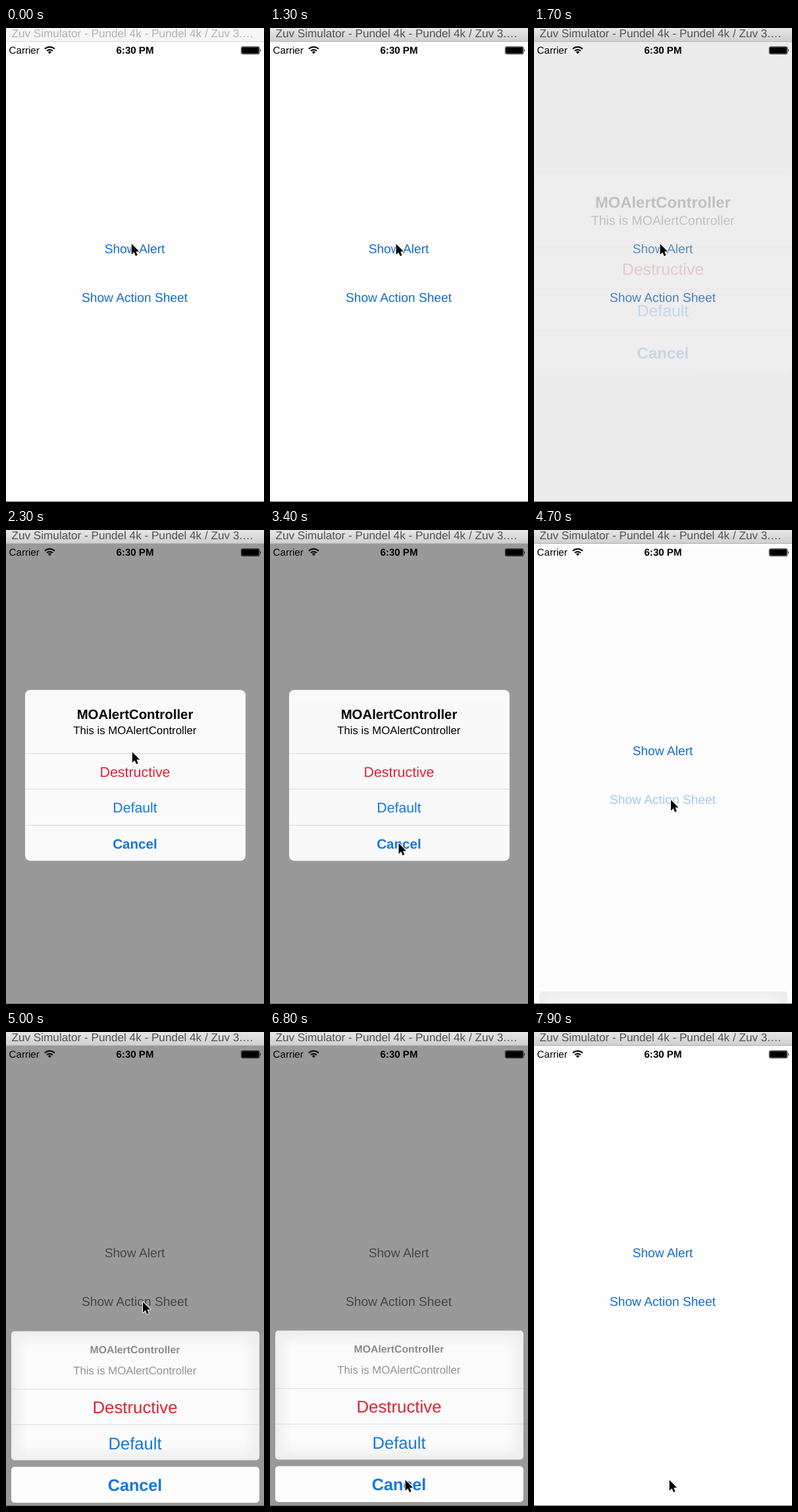
Write an HTML page that moves like this. It is 392 px wide and 720 px high and loops after 8 s.

```html
<!DOCTYPE html>
<html lang="en">
<head>
<meta charset="utf-8">
<title>Alert and action sheet</title>
<style>
  html, body { margin: 0; width: 100%; height: 100%; overflow: hidden; background: #fefefe; }
  svg { display: block; width: 392px; height: 720px; }
  text { font-family: "Liberation Sans", Arial, sans-serif; text-rendering: geometricPrecision; }
  .mid { text-anchor: middle; }
  .bold { font-weight: bold; }
  .red { fill: #da2432; }
  .blue { fill: #1377de; }
  .line { stroke: #dcdcde; stroke-width: 1; }
  .glow { filter: blur(9px); }
</style>
</head>
<body>
<svg viewBox="0 0 392 720" xmlns="http://www.w3.org/2000/svg">
  <defs>
    <linearGradient id="chrome" x2="0" y2="1">
      <stop offset="0" stop-color="#e6e6e6"/>
      <stop offset="1" stop-color="#cfcfcf"/>
    </linearGradient>
    <clipPath id="panelClip"><rect x="8" y="453.5" width="377" height="196" rx="5"/></clipPath>
    <clipPath id="phoneClip"><rect y="21" width="392" height="698"/></clipPath>
  </defs>

  <rect width="392" height="720" fill="#fefefe"/>
  <g id="buttons" class="mid" font-size="19.2">
    <text id="alertBtn" x="195.5" y="342">Show Alert</text>
    <text id="sheetBtn" x="195.5" y="416">Show Action Sheet</text>
  </g>
  <rect id="dim" y="21" width="392" height="699"/>

  <g id="status">
    <text x="4.6" y="39" font-size="15.1">Carrier</text>
    <text x="196" y="39" font-size="15.1" class="mid bold">6:30 PM</text>
    <g fill="none" stroke="#000" stroke-width="2">
      <path d="M58.9 31.8a10.6 10.6 0 0 1 15 0"/>
      <path d="M61.9 34.8a6.4 6.4 0 0 1 9 0"/>
    </g>
    <path d="M66.4 39.2l-2.6-2.7a3.7 3.7 0 0 1 5.2 0z"/>
    <rect x="357.4" y="28.4" width="27.7" height="11.2" rx="2" fill="none" stroke="#000" stroke-width=".8"/>
    <rect x="358.2" y="29.2" width="26" height="9.6" rx="1.2"/>
    <path d="M386 32q2 2 0 4z"/>
  </g>

  <g id="alert" class="mid">
    <rect x="29" y="243" width="335" height="259.5" rx="8" fill="#fafafa"/>
    <path class="line" d="M29 339.5H364M29 393.5H364M29 448.5H364"/>
    <text x="196" y="287" font-size="20.4" class="bold">MOAlertController</text>
    <text x="195.8" y="309.5" font-size="16.75">This is MOAlertController</text>
    <text x="196" y="374.5" font-size="21.4" class="red">Destructive</text>
    <text x="196" y="429.2" font-size="21.3" class="blue">Default</text>
    <text x="196" y="483.5" font-size="20.6" class="blue bold">Cancel</text>
  </g>

  <g clip-path="url(#phoneClip)">
    <g id="sheet" class="mid">
      <g clip-path="url(#panelClip)">
        <rect x="8" y="453" width="377" height="197" fill="#eeeeee"/>
        <rect x="20" y="466" width="353" height="172" fill="#fbfbfb" class="glow"/>
        <path class="line" d="M8 541.5H385M8 595.5H385"/>
      </g>
      <rect x="8" y="659.5" width="377" height="54.5" rx="5" fill="#fdfdfd"/>
      <text x="196" y="486.7" font-size="15.8" class="bold" fill="#8a8a8a">MOAlertController</text>
      <text x="195.8" y="519.2" font-size="16.75" fill="#939393">This is MOAlertController</text>
      <text x="196" y="578.2" font-size="25.8" class="red">Destructive</text>
      <text x="196" y="632.6" font-size="25.6" class="blue">Default</text>
      <text x="196" y="696.4" font-size="25.2" class="blue bold">Cancel</text>
    </g>
  </g>

  <rect id="bar" width="392" height="20.5"/>
  <rect id="barLine" y="20" width="392" height="1"/>
  <text id="title" x="8.5" y="14" font-size="17.15">Zuv Simulator - Pundel 4k - Pundel 4k / Zuv 3.…</text>
  <rect y="719" width="392" height="1" fill="#6c6c6c"/>

  <path id="cursor" d="M0 0V16.2L3.8 12.7 6.2 18.4 8.9 17.3 6.5 11.6H11.5Z"
        stroke="#fff" stroke-width="2" stroke-linejoin="round" paint-order="stroke"/>
</svg>

<script>
const LOOP = 8000, STEP = 100;
const $ = id => document.getElementById(id);
const set = (id, attrs) => {
  for (const k in attrs) $(id).setAttribute(k, attrs[k]);
};

const ramp = (t, a, b) => Math.min(1, Math.max(0, (t - a) / (b - a)));
const ease = (t, a, b) => {
  const p = ramp(t, a, b);
  return p < .5 ? 2 * p * p : 1 - 2 * (1 - p) ** 2;
};
const mix = (a, b, p) => a + (b - a) * p;
// Critically damped spring, 0 to 1
const spring = (t, start, w) => {
  const x = Math.max(0, t - start) / 1000 * w;
  return 1 - (1 + x) * Math.exp(-x);
};

// Pointer legs: start, end, target x, target y
const legs = [
  [0, 300, 145, 403],
  [300, 600, 239, 404],
  [700, 1000, 191.6, 328],
  [2150, 3000, 195.5, 475.8],
  [3650, 4300, 208, 410],
  [5650, 6500, 205.7, 680.6]
];
function pointer(t) {
  let x = 190.8, y = 327.8;
  for (const [a, b, tx, ty] of legs) {
    const p = ease(t, a, b);
    x = mix(x, tx, p);
    y = mix(y, ty, p);
  }
  return [x, y];
}

const TINT = [20, 110, 204], GRAY = [114, 114, 114];
const press = (t, down, up) =>
  t >= down && t < up + 300 ? mix(.25, 1, ease(t, up, up + 300)) : 1;

function draw(t) {
  const active = t >= 1300;
  set("bar", { fill: active ? "url(#chrome)" : "#f6f6f6" });
  set("barLine", { fill: active ? "#b2b2b2" : "#d6d6d6" });
  set("title", { fill: active ? "#505050" : "#b2b2b2" });

  const alertIn = ease(t, 1580, 1980);
  const alertShown = alertIn * (1 - ease(t, 3390, 3640));
  const sheetDim = ease(t, 4680, 4980) * (1 - ease(t, 7450, 7750));
  const shade = alertShown + sheetDim;

  const color = TINT.map((c, i) => Math.round(mix(c, GRAY[i], shade)));
  set("buttons", { fill: `rgb(${color})` });
  set("alertBtn", { opacity: press(t, 1400, 1480) });
  set("sheetBtn", { opacity: press(t, 4600, 4620) });
  set("dim", { opacity: .4 * shade });

  const scale = mix(1.2, 1, alertIn);
  set("alert", {
    opacity: alertShown,
    transform: `translate(196.5 372.7) scale(${scale}) translate(-196.5 -372.7)`
  });

  const up = spring(t, 4680, 24) - spring(t, 7450, 22);
  set("sheet", {
    transform: `translate(0 ${270 * (1 - up)})`,
    visibility: t > 4680 && t < 7850 ? "visible" : "hidden"
  });

  set("cursor", { transform: `translate(${pointer(t)})` });
}

const begin = performance.now();
function tick() {
  const t = (performance.now() - begin) % LOOP;
  draw(Math.floor(t / STEP) * STEP);
  requestAnimationFrame(tick);
}
tick();
</script>
</body>
</html>
```
